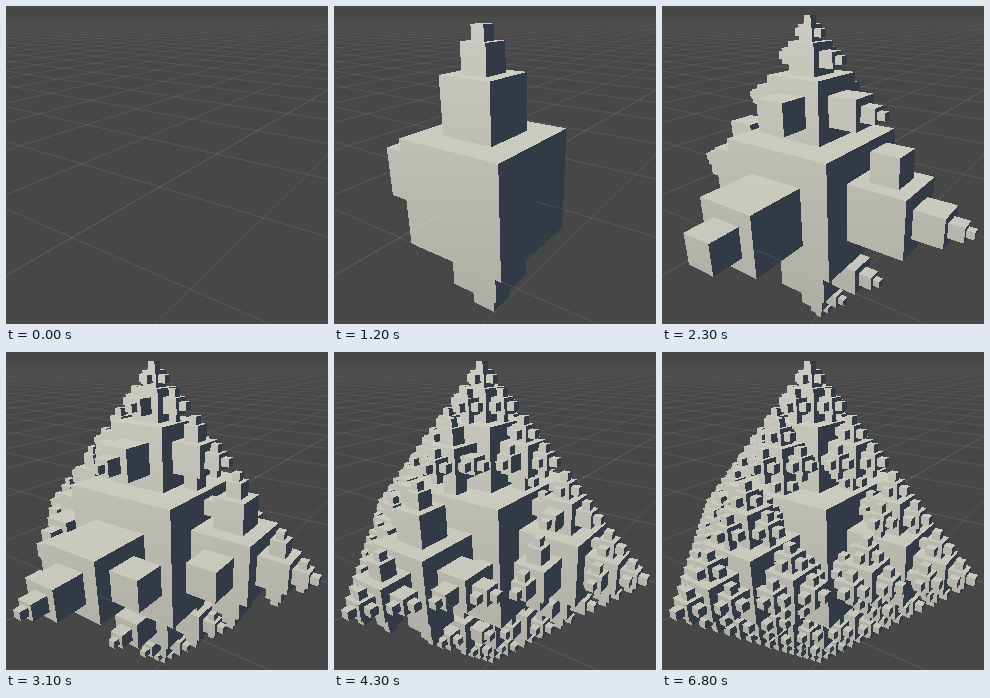
Recreate the animation shown at these times as an HTML page with a canvas. Size 322 by 318 pixels, loop 7.7 s.

```html
<!DOCTYPE html>
<html lang="en">
<head>
<meta charset="utf-8">
<title>Cube fractal</title>
<style>
  html, body { margin: 0; width: 100%; height: 100%; overflow: hidden; background: #474747; }
  canvas { display: block; width: 322px; height: 318px; }
</style>
</head>
<body>
<canvas id="stage" width="322" height="318"></canvas>
<script>
const W = 322, H = 318, LOOP = 7700, MAX_DEPTH = 4;
const BACK = 71, FAR = 10.6, NEAR = 0.4;

// Face colours; slope brightens a face towards the top of the stage
const TOP = { rgb: [202, 202, 190], slope: 0.03 };
const FRONT = { rgb: [189, 188, 178], slope: 0.1 };
const SIDE = { rgb: [50, 59, 69], slope: 0 };

const ctx = document.getElementById('stage').getContext('2d');
const image = ctx.createImageData(W, H);
const depth = new Float32Array(W * H);

// Start time of each growth step, in ms
const ticks = [400];
for (const d of '23332333233333233323333') ticks.push(ticks[ticks.length - 1] + d * 100);

// Perspective camera: returns screen x, y and inverse depth
function project(x, y, z) {
  const w = 1 - x / 7.11 - 0.104 * y + z / 4.76;
  return [
    (153.7 + 67.5 * x - 19.5 * y + 101.6 * z) / w,
    (181 + x - 120.6 * y - 1.9 * z) / w,
    1 / w
  ];
}

const neg = v => v.map(n => -n);
const move = (p, v, s) => p.map((n, i) => n + v[i] * s);

// Local axes of a child for each growth direction; its second axis points outwards
const TURNS = [
  (x, y, z) => [x, y, z],
  (x, y, z) => [neg(x), neg(y), z],
  (x, y, z) => [y, neg(x), z],
  (x, y, z) => [neg(y), x, z],
  (x, y, z) => [x, z, neg(y)],
  (x, y, z) => [x, neg(z), y]
];

const cubes = [];
function grow(pos, size, axes, tick, level) {
  cubes.push({ pos, half: size / 2, tick });
  if (level === MAX_DEPTH) return;
  TURNS.forEach((turn, i) => {
    if (i === 1 && level > 0) return; // would lie inside its grandparent
    const next = turn(...axes);
    grow(move(pos, next[1], size * 0.75), size / 2, next, tick + 1 + i, level + 1);
  });
}
grow([0, 0, 0], 1, [[1, 0, 0], [0, 1, 0], [0, 0, 1]], 0, 0);

function triangle(a, b, c, { rgb, slope }) {
  const area = (b[0] - a[0]) * (c[1] - a[1]) - (b[1] - a[1]) * (c[0] - a[0]);
  if (Math.abs(area) < 1e-6) return;
  const x0 = Math.max(0, Math.floor(Math.min(a[0], b[0], c[0])));
  const x1 = Math.min(W - 1, Math.ceil(Math.max(a[0], b[0], c[0])));
  const y0 = Math.max(0, Math.floor(Math.min(a[1], b[1], c[1])));
  const y1 = Math.min(H - 1, Math.ceil(Math.max(a[1], b[1], c[1])));
  for (let y = y0; y <= y1; y++) {
    const color = rgb.map(n => n + (H / 2 - y) * slope);
    for (let x = x0; x <= x1; x++) {
      const px = x + 0.5 - a[0], py = y + 0.5 - a[1];
      const u = (px * (c[1] - a[1]) - py * (c[0] - a[0])) / area;
      const v = (py * (b[0] - a[0]) - px * (b[1] - a[1])) / area;
      if (u < 0 || v < 0 || u + v > 1) continue;
      const d = a[2] + u * (b[2] - a[2]) + v * (c[2] - a[2]);
      const i = y * W + x;
      if (d <= depth[i]) continue;
      depth[i] = d;
      image.data.set(color, i * 4);
    }
  }
}

function quad(a, b, c, d, paint) {
  triangle(a, b, c, paint);
  triangle(a, c, d, paint);
}

// Only the three sides that face the camera
function drawCube({ pos: [x, y, z], half: h }) {
  const p = (i, j, k) => project(x + i * h, y + j * h, z + k * h);
  const near = p(1, 1, -1), left = p(-1, 1, -1), right = p(1, 1, 1), base = p(1, -1, -1);
  quad(near, left, p(-1, 1, 1), right, TOP);
  quad(near, left, p(-1, -1, -1), base, FRONT);
  quad(near, right, p(1, -1, 1), base, SIDE);
}

function blend(x, y, d, alpha) {
  if (x < 0 || y < 0 || x >= W || y >= H) return;
  const i = y * W + x;
  if (depth[i] > d) return;
  for (let k = i * 4; k < i * 4 + 3; k++) image.data[k] += (235 - image.data[k]) * alpha;
}

function gridLine(a, b, strength) {
  const dx = b[0] - a[0], dy = b[1] - a[1];
  const steep = Math.abs(dy) > Math.abs(dx);
  const m = steep ? 1 : 0, n = 1 - m;
  if (a[m] > b[m]) [a, b] = [b, a];
  const start = Math.max(0, Math.ceil(a[m] - 0.5));
  const end = Math.min((steep ? H : W) - 1, Math.floor(b[m] - 0.5));
  for (let s = start; s <= end; s++) {
    const t = (s + 0.5 - a[m]) / (b[m] - a[m]);
    const d = a[2] + t * (b[2] - a[2]);
    const q = a[n] + t * (b[n] - a[n]) - 0.5;
    const lo = Math.floor(q), f = q - lo;
    const alpha = strength * Math.max(0, 1 - 1 / d / 11.5) ** 1.5;
    for (const [o, k] of [[lo, 1 - f], [lo + 1, f]]) {
      if (steep) blend(o, s, d, alpha * k);
      else blend(s, o, d, alpha * k);
    }
  }
}

function drawGrid() {
  for (let i = -75; i <= 50; i++) {
    const zAt = w => (w - 1 + i / 7.11) * 4.76;
    const xAt = w => (1 + i / 4.76 - w) * 7.11;
    gridLine(project(i, 0, zAt(NEAR)), project(i, 0, zAt(FAR)), i === 0 ? 0.18 : 0.12);
    gridLine(project(xAt(NEAR), 0, i), project(xAt(FAR), 0, i), 0.12);
  }
}

function draw(step) {
  depth.fill(0);
  image.data.fill(BACK);
  for (let i = 3; i < image.data.length; i += 4) image.data[i] = 255;
  for (const cube of cubes) if (cube.tick <= step) drawCube(cube);
  drawGrid();
  ctx.putImageData(image, 0, 0);
}

let shown = null;
function frame() {
  const t = performance.now() % LOOP;
  const step = ticks.filter(start => start <= t).length - 1;
  if (step !== shown) draw(shown = step);
  requestAnimationFrame(frame);
}
frame();
</script>
</body>
</html>
```
